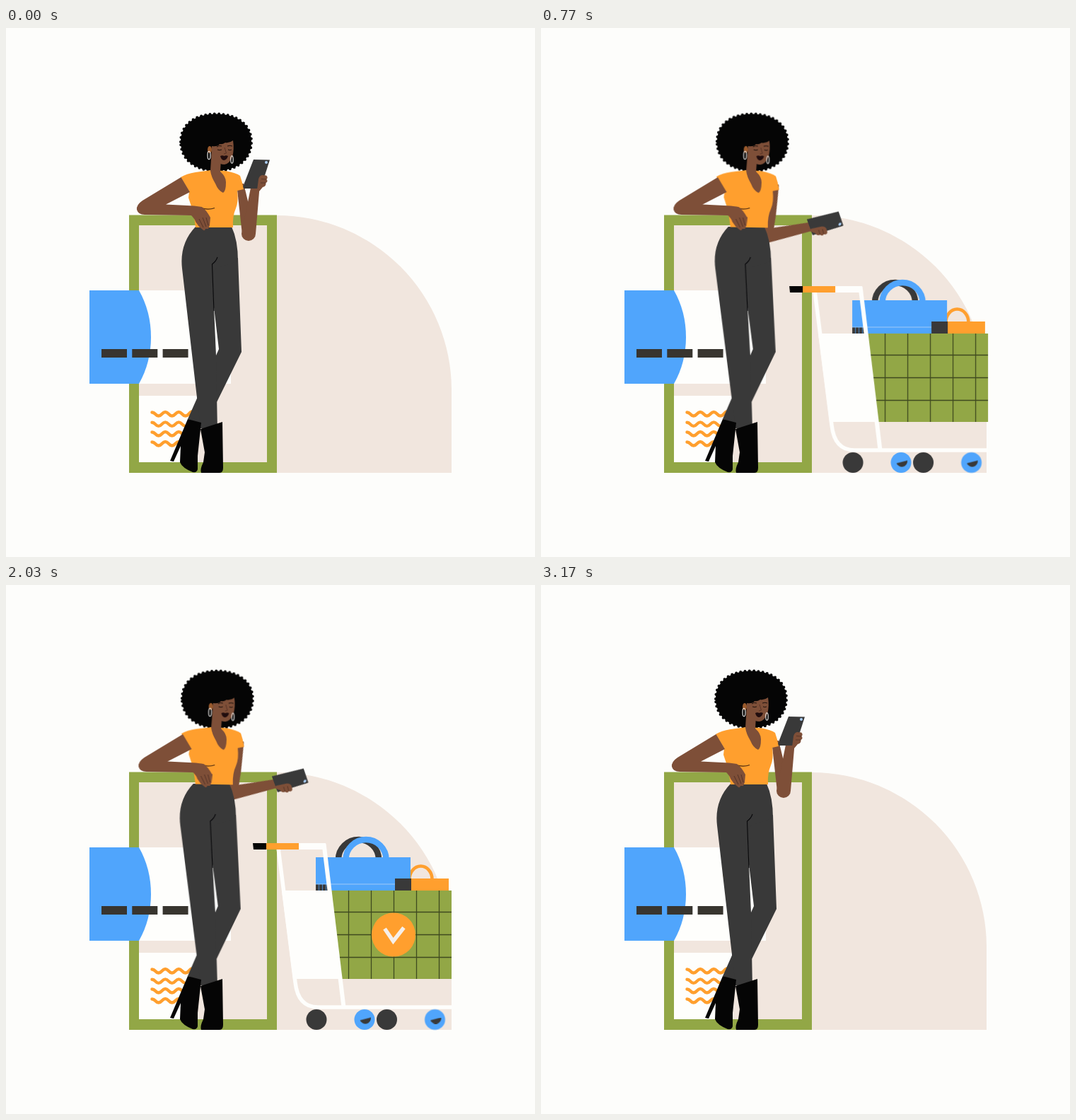
These frames come from a looping animation (748 px wide and 748 px high, 3200 ms). An HTML page without scripts:

```html
<!DOCTYPE html>
<html lang="en">
<head>
<meta charset="utf-8">
<title>Shopping from the phone</title>
<style>
html, body { margin: 0; width: 100%; height: 100%; overflow: hidden; background: #fdfdfb; }
svg { display: block; width: 100vw; height: 100vh; }
.beige { fill: #f1e6de; }
.green { fill: #92a746; }
.blue { fill: #50a5fc; }
.orange { fill: #ff9f2e; }
.dark { fill: #393939; }
.ink { fill: #050505; }
.skin { fill: #7e4f38; }
.white { fill: #fefefc; }
.line { fill: none; }

.move { animation: 3.2s linear infinite; }
.torso { animation-name: lean; transform-origin: 295px 268px; }
.rest { animation-name: slide; }
.legs { animation-name: hip; transform-origin: 290px 565px; }
.upper { animation-name: upper; transform-origin: 331px 222px; }
.fore { animation-name: fore; transform-origin: 343px 291px; }
.phone { animation-name: phone; transform-origin: 355px 207px; }
.cart { animation-name: drive; }
.show { animation-name: show; }
.bag { animation-name: bag; }
.purse { animation-name: purse; }
.hub { animation-name: roll; transform-origin: 0 0; }
.badge { animation-name: pop; transform-origin: 548px 494.5px; }
.tick { animation-name: tick; stroke-dasharray: 1 2; }

@keyframes lean {
  0%, 8.75% { transform: none; animation-timing-function: ease-in-out; }
  23.75%, 66.5% { transform: rotate(1deg); animation-timing-function: ease-in-out; }
  78.75%, 100% { transform: none; }
}
@keyframes slide {
  0%, 8.75% { transform: none; animation-timing-function: ease-in-out; }
  23.75%, 66.5% { transform: translateX(2.5px); animation-timing-function: ease-in-out; }
  78.75%, 100% { transform: none; }
}
@keyframes hip {
  0%, 8.75% { transform: none; animation-timing-function: ease-in-out; }
  23.75%, 66.5% { transform: skewX(.65deg); animation-timing-function: ease-in-out; }
  78.75%, 100% { transform: none; }
}
@keyframes upper {
  0%, 8.75% { transform: none; animation-timing-function: cubic-bezier(.6, 0, .5, 1); }
  23.75%, 66.5% { transform: rotate(19deg); animation-timing-function: ease-in-out; }
  79.5% { transform: rotate(-3.5deg); animation-timing-function: ease-in-out; }
  91%, 100% { transform: none; }
}
@keyframes fore {
  0%, 8.75% { transform: none; animation-timing-function: ease-in-out; }
  23.75%, 66.5% { transform: translateY(3px) rotate(51deg); animation-timing-function: ease-in-out; }
  79.5% { transform: rotate(-1deg); animation-timing-function: ease-in-out; }
  91%, 100% { transform: none; }
}
/* the phone turns in the hand, seen in slight perspective */
@keyframes phone {
  0%, 8.75% { transform: none; animation-timing-function: ease-in; }
  14.69% { transform: rotate(-13deg) skewX(2deg) scale(1.25, 1); animation-timing-function: ease-out; }
  23.75%, 66.5% { transform: rotate(0deg) skewX(12deg) scale(.92, 1.12); animation-timing-function: ease-in-out; }
  79.5%, 100% { transform: none; }
}
@keyframes drive {
  0% { transform: translateX(-305px); animation-timing-function: cubic-bezier(.333, 0, .667, .333); }
  6.25% { transform: translateX(-210px); animation-timing-function: cubic-bezier(.33, .44, .6, .9); }
  14.69% { transform: translateX(-18px); animation-timing-function: cubic-bezier(.3, .35, .6, 1); }
  19.4% { transform: translateX(5px); animation-timing-function: ease-in-out; }
  28%, 68.75% { transform: none; animation-timing-function: cubic-bezier(.333, 0, .667, .333); }
  83.45%, 100% { transform: translateX(75px); }
}
@keyframes show {
  0%, .7% { opacity: 0; }
  2.5%, 82% { opacity: 1; }
  84.4%, 100% { opacity: 0; }
}
@keyframes bag {
  0% { transform: translateX(-24px); }
  6.25% { transform: translateX(-21px); }
  14.69% { transform: translateX(-4px); animation-timing-function: ease-out; }
  24%, 68.75% { transform: none; animation-timing-function: cubic-bezier(.333, 0, .667, .333); }
  83.45%, 100% { transform: translateX(-14px); }
}
@keyframes purse {
  0% { transform: translateX(-42px); }
  6.25% { transform: translateX(-36px); }
  14.69% { transform: translateX(-15px); animation-timing-function: ease-out; }
  25%, 100% { transform: none; }
}
@keyframes roll {
  0% { transform: rotate(-520deg); animation-timing-function: ease-in; }
  6.25% { transform: rotate(-360deg); animation-timing-function: cubic-bezier(.33, .44, .6, .9); }
  14.69% { transform: rotate(-36deg); animation-timing-function: ease-out; }
  24%, 68.75% { transform: none; animation-timing-function: cubic-bezier(.333, 0, .667, .333); }
  83.45%, 100% { transform: rotate(80deg); }
}
@keyframes pop {
  0%, 27% { transform: scale(0); animation-timing-function: ease-out; }
  34.5%, 78.5% { transform: none; animation-timing-function: ease-in; }
  84.4%, 100% { transform: scale(0); }
}
@keyframes tick {
  0%, 32% { stroke-dashoffset: 1; animation-timing-function: ease-in-out; }
  38%, 100% { stroke-dashoffset: 0; }
}
</style>
</head>
<body>
<svg viewBox="0 0 748 748">
  <defs>
    <path id="wave" d="M206.500 543.500q2.500 0 4.500 2.300q4.750 5.500 9.500 0t9.500 0t9.500 0t9.500 0t9.500 0t5 -2" class="line" stroke="#ff9f2e" stroke-width="4.400" stroke-linecap="round"/>
    <clipPath id="basket"><path d="M460 432H630V557H474Z"/></clipPath>
  </defs>

  <!-- backdrop -->
  <path class="beige" d="M383 265A247 247 0 0 1 630 512V629H383Z"/>
  <path class="green" d="M174 264.500H383V629H174Z"/>
  <path class="beige" d="M188 279H369V614H188Z"/>
  <path class="white" d="M188 520H270V614H188Z"/>
  <path class="white" d="M188 371H318V503H188Z"/>
  <path class="blue" d="M118 371H188Q205 401 205 437T188 503H118Z"/>
  <circle class="orange" cx="269" cy="408" r="12"/>
  <path d="M135 460H258" class="line" stroke="#38352f" stroke-width="12" stroke-dasharray="36 7.300"/>
  <use href="#wave"/>
  <use href="#wave" y="14.300"/>
  <use href="#wave" y="28"/>
  <use href="#wave" y="42"/>

  <!-- arm with phone -->
  <g class="move upper">
    <path class="skin" d="M326 220H336Q341 240 346 262L351 290L343 299L334 292Z"/>
    <g class="move fore">
      <path class="skin" d="M333 291L346 226L351 220H358V232L353 291A10 10 0 0 1 333 291Z"/>
      <g class="move phone">
        <path class="dark" d="M350 186L373 186.500L360 227L334 227Z"/>
        <circle cx="368" cy="190" r="2" fill="#a9cdf5"/>
      </g>
      <path class="skin" d="M355 229L357 214Q358 209 362 208L368 208.500Q371 211 368.500 214Q371 217 367.500 219Q368 224 363 225L358 231Z"/>
      <path class="line" stroke="#4a2b22" stroke-width=".7" d="M361 213.500L368 214M360 219L367 219"/>
    </g>
  </g>

  <!-- legs and boots -->
  <g class="move legs">
    <path class="dark" d="M290 330L328 325L333 458L299 527L280 562L257 553L301 454L294 395Z"/>
    <path class="dark" d="M268 281H319Q328 300 328 330L296 340L292 350L297 463L299 570L275 566L249 340Q245 305 268 281Z"/>
    <path class="line" stroke="#08080a" stroke-width="1.100" d="M299 324Q297 330 291.500 334L294 400"/>
  </g>
  <path class="ink" d="M257 553L276 558L271 605V624Q270 629 264 628Q249 622 246 614L247 591L237 613L232 612Z"/>
  <path class="ink" d="M275 567L306 557L307 622Q307 629 302 629H276Q274 624 279 614L281 600Z"/>

  <!-- torso and head -->
  <g class="move torso">
    <path class="ink" d="M247 161C247 136 268 121.500 297 121.500S347 136 347 161S326 202 297 202S247 186 247 161Z" stroke="#050505" stroke-width="4" stroke-linecap="round" stroke-dasharray="0 6.300"/>
    <path class="orange" d="M247 211Q255 206 268 204L290 201L310 202Q326 205 331 209Q334 217 336 228L327 230Q329 245 325 255Q320 266 321 282H268Q266 262 258 240L259 231Z"/>
    <path class="skin" d="M290 186H304L303 203Q311 210 311 218Q311 231 307 233Q300 230 296 220Q290 210 289 202Z"/>
    <path class="skin" d="M291 167Q300 168 302 164Q306 165 310 162Q316 163 321 159Q323 172 320 182Q316 192 309 193Q302 193 297 188L290 186Z"/>
    <ellipse cx="288" cy="172" rx="3" ry="5" fill="#9a5a2c"/>
    <path class="line" stroke="#1d110d" stroke-width="1" d="M298 168Q301 165.500 305 167M313 167Q317 165.500 320 167M299 172Q302 173.500 305 172M314 172Q317 173.500 319 172"/>
    <path class="line" stroke="#4f2d22" stroke-width=".8" d="M309 169L311.500 177L308 178"/>
    <path d="M303 181Q306 179.500 308.500 181Q311 179.500 314 181Q312 187 307.500 187Q304 186 303 181Z" fill="#210d0e"/>
    <g class="line" stroke="#f7f5f3" stroke-width="1.100">
      <ellipse cx="287" cy="180" rx="2" ry="5.800"/>
      <ellipse cx="319.500" cy="186" rx="1.700" ry="5.300"/>
    </g>
    <path class="line" stroke="#4a2a10" stroke-width="1.200" d="M275 254Q285 258 295 254.500"/>
  </g>
  <g class="move rest">
    <path class="skin" d="M247.500 211L193 244Q184 250 185 257Q187 264 196 264L262 265Q267 270 268 274L273 281L278 285Q281 288 282 284L286 284L288 279L289 268Q283 257 277 253L266 251.500L226 249.500L260 232Z"/>
    <path class="line" stroke="#4a2b22" stroke-width=".8" d="M273 270L279 282M278 268L283 281M283 268L286 279"/>
  </g>

  <!-- shopping cart -->
  <g class="move show">
    <g class="move cart">
      <g class="move bag">
        <g class="move purse">
          <path class="line" stroke="#ff9f2e" stroke-width="4.600" d="M570.500 416A16 18.500 0 0 1 602.500 416"/>
          <path class="orange" d="M565 415H626V432H565Z"/>
        </g>
        <path class="line" stroke="#393939" stroke-width="8.500" d="M470 388A28.500 28 0 0 1 527 388"/>
        <path class="line" stroke="#50a5fc" stroke-width="8.500" d="M480.500 388A28.500 28 0 0 1 537.500 388"/>
        <path class="blue" d="M438 385H572V432H438Z"/>
        <path class="line" stroke="#9fc9f6" stroke-width="1" d="M438 423H572"/>
        <path class="dark" d="M550 415H573V432H550Z"/>
        <path class="line" stroke="#393939" stroke-width="8.500" stroke-dasharray="4.300 .7" d="M438 427.700H458"/>
      </g>
      <path class="white" d="M390 432H461L475 557H406Z"/>
      <g clip-path="url(#basket)">
        <path class="green" d="M455 432H630V557H455Z"/>
        <path class="line" stroke="#3f4a1f" stroke-width="1.300" d="M455 462.500H630M455 494.500H630M455 526.500H630M484.500 432V557M516.500 432V557M548.500 432V557M580.500 432V557M612.500 432V557"/>
      </g>
      <path class="line" stroke="#fefefc" stroke-width="5.500" d="M385 372L409 562Q413 597 441 597H630"/>
      <path class="line" stroke="#fefefc" stroke-width="6" d="M449.500 366L477.500 597"/>
      <path class="white" d="M412 365H452V374H412Z"/>
      <path class="orange" d="M367 365H414V374H367Z"/>
      <path class="ink" d="M349 365H368V374H350Z"/>
      <g class="dark">
        <circle cx="439" cy="614.500" r="14.500"/>
        <circle cx="538.500" cy="614.500" r="14.500"/>
      </g>
      <g transform="translate(507 614.500)">
        <circle class="blue" r="14.500"/>
        <path class="move hub dark" d="M-6.500 1L9 -3A8.100 8.100 0 0 1 -6.500 1Z"/>
      </g>
      <g transform="translate(606.500 614.500)">
        <circle class="blue" r="14.500"/>
        <path class="move hub dark" d="M-6.500 1L9 -3A8.100 8.100 0 0 1 -6.500 1Z"/>
      </g>
    </g>
  </g>

  <!-- confirmation badge -->
  <g class="move badge">
    <circle class="orange" cx="548" cy="494.500" r="31"/>
    <path class="move tick line" pathLength="1" stroke="#f6efe9" stroke-width="5.500" d="M535.500 486L547.500 503.500L562.500 484.500"/>
  </g>
</svg>
</body>
</html>
```
